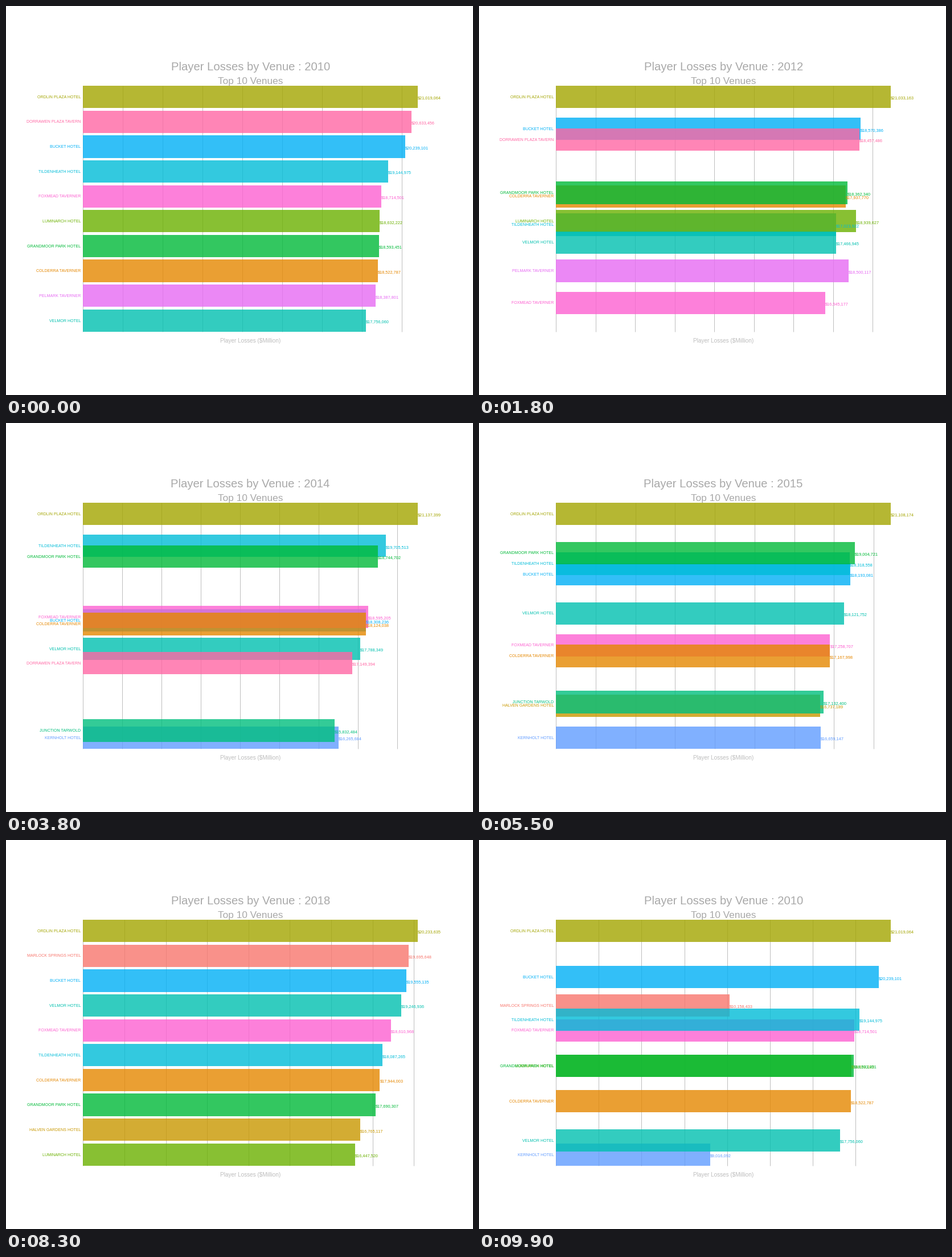
Animation, 820 px wide and 683 px high, one loop 10000 ms. Source, as a matplotlib script:

```python
import numpy as np
import matplotlib.pyplot as plt
from matplotlib.animation import FuncAnimation
from matplotlib.collections import LineCollection
from matplotlib.patches import Rectangle

plt.rcParams["font.family"] = "Liberation Sans"

W, H, DPI = 820, 683, 64        # a power of two keeps the pixel size exact
LEFT, RIGHT, TOP, BOTTOM = 135.3, 723.0, 140.0, 572.0
ROW = (BOTTOM - TOP) / 9.9      # ten rows, each bar 0.9 of a row high
BAR = 0.9 * ROW
HOLD, MOVE = 4, 6               # frames at rest and between years
PERIOD = HOLD + MOVE

# Listed from back to front.
VENUES = {
    "K": ("KERNHOLT HOTEL", "#619CFF"),
    "H": ("HALVEN GARDENS HOTEL", "#C99800"),
    "M": ("MARLOCK SPRINGS HOTEL", "#F8766D"),
    "B": ("BUCKET HOTEL", "#00B0F6"),
    "F": ("FOXMEAD TAVERNER", "#FD61D1"),
    "C": ("COLDERRA TAVERNER", "#E58700"),
    "T": ("TILDENHEATH HOTEL", "#00BCD8"),
    "L": ("LUMINARCH HOTEL", "#6BB100"),
    "G": ("GRANDMOOR PARK HOTEL", "#00BA38"),
    "V": ("VELMOR HOTEL", "#00C0AF"),
    "D": ("DORRAWEN PLAZA TAVERN", "#FF67A4"),
    "J": ("JUNCTION TARWOLD", "#00BF7D"),
    "P": ("PELMARK TAVERNER", "#E76BF3"),
    "Q": ("QUENFORD PARK HOTEL", "#B983FF"),
    "O": ("ORDLIN PLAZA HOTEL", "#A3A500"),
}

# Venues by rank and their losses, one entry per year.
FIRST_YEAR = 2010
YEARS = [
    ("ODBTFLGCPV", [21019064, 20633456, 20239101, 19144975, 18714501,
                    18632222, 18593451, 18522787, 18387801, 17756060]),
    ("ODBTCLGPVF", [21452318, 21018642, 20931275, 19378460, 19232914,
                    18939627, 18551208, 18500117, 18331846, 18243590]),
    ("OBDGCVTJFK", [21033163, 18570386, 18457486, 18362340, 17937770,
                    17466945, 17023922, 16804518, 16545177, 16412736]),
    ("OGTCVBDFJK", [21727405, 18822951, 18203677, 17772140, 17315862,
                    17244309, 17149394, 16981526, 16522813, 16265684]),
    ("OTGFBCVHLJ", [21137399, 19705513, 18744702, 18595205, 18308236,
                    18124038, 17788349, 16912475, 16304861, 15832484]),
    ("OGTBVFCJHK", [21108174, 19004721, 18318558, 18193081, 18121752,
                    17258707, 17167998, 17132400, 16737189, 16659147]),
    ("OBTGVCFHMJ", [20995416, 19369240, 18930587, 18342918, 18164305,
                    17412660, 17250931, 16356274, 16243518, 16124790]),
    ("OBMTGFVCKQ", [20796650, 19440082, 18935950, 18249404, 17671772,
                    17509418, 17508640, 17442370, 17277002, 17052483]),
    ("OMBVFTCGHL", [20233635, 19695648, 19555135, 19246936, 18610968,
                    18087265, 17944003, 17690307, 16765117, 16447520]),
    ("OBGMFVCTLK", [10841207, 10628455, 10201318, 10158433, 9862740,
                    9664915, 9501386, 9380172, 9081664, 9016092]),
]
STATES = [{key: (rank, value) for rank, (key, value) in enumerate(zip(*year))}
          for year in YEARS]
FRAMES = PERIOD * len(STATES)

fig = plt.figure(figsize=(W / DPI, H / DPI), dpi=DPI, facecolor="white")
ax = fig.add_axes([0, 0, 1, 1])
ax.set_xlim(0, W)
ax.set_ylim(H, 0)
ax.axis("off")


def label(x, y, text, px, color, ha="center", z=5):
    return ax.text(x, y, text, fontsize=px * 72 / DPI, color=color,
                   ha=ha, va="baseline", zorder=z)


MID = (LEFT + RIGHT) / 2
title = label(MID, 112.7, "", 20.3, "#A9A9A9")
label(MID, 137.5, "Top 10 Venues", 17.2, "#A9A9A9")
label(MID, 591, "Player Losses ($Million)", 10, "#BEBEBE")

grid = LineCollection([], colors="#BEBEBE", linewidths=72 / DPI, zorder=1)
ax.add_collection(grid, autolim=False)

bars, names, amounts = {}, {}, {}
for key, (name, color) in VENUES.items():
    bars[key] = ax.add_patch(Rectangle((LEFT, 0), 0, BAR, facecolor=color,
                                       alpha=0.8, linewidth=0, zorder=2))
    names[key] = label(131.3, 0, name, 7, color, "right", 3)
    amounts[key] = label(0, 0, "", 7.4, color, "left", 4)


def grid_step(top):
    """Spacing of the main grid lines for an axis from 0 to top."""
    for limit, step in ((11.6, 2.5), (12.7, 3), (15.5, 5), (16.8, 4)):
        if top < limit * 1e6:
            return step * 1e6
    return 5e6


def draw(frame):
    index, tick = divmod(frame, PERIOD)
    p = max(0, tick - HOLD + 1) / (MOVE + 1)
    now, after = STATES[index], STATES[(index + 1) % len(STATES)]
    late = p > 0.5

    # Leaving venues stay put until the move ends; new ones appear after it.
    pose = {key: np.add(np.multiply(start, 1 - p),
                        np.multiply(after.get(key, start), p))
            for key, start in now.items()}
    top = pose["O"][1]
    scale = (RIGHT - LEFT) / top

    xs = LEFT + np.arange(0, top, grid_step(top) / 2) * scale
    grid.set_segments([[(x, TOP), (x, BOTTOM)] for x in xs])
    shown = (index + late) % len(STATES)
    title.set_text(f"Player Losses by Venue : {FIRST_YEAR + shown}")

    for key in VENUES:
        parts = bars[key], names[key], amounts[key]
        for part in parts:
            part.set_visible(key in pose)
        if key not in pose:
            continue
        rank, value = pose[key]
        y = TOP + rank * ROW
        bars[key].set_y(y)
        bars[key].set_width(value * scale)
        names[key].set_y(y + BAR / 2 + 2.2)
        source = after.get(key, now[key]) if late else now[key]
        amounts[key].set_text(f"\\${source[1]:,}")
        amounts[key].set_position((LEFT + value * scale, y + BAR / 2 + 3.9))
    return []


anim = FuncAnimation(fig, draw, frames=FRAMES, interval=100,
                     init_func=lambda: draw(0), repeat=True, repeat_delay=0)
plt.show()
```
